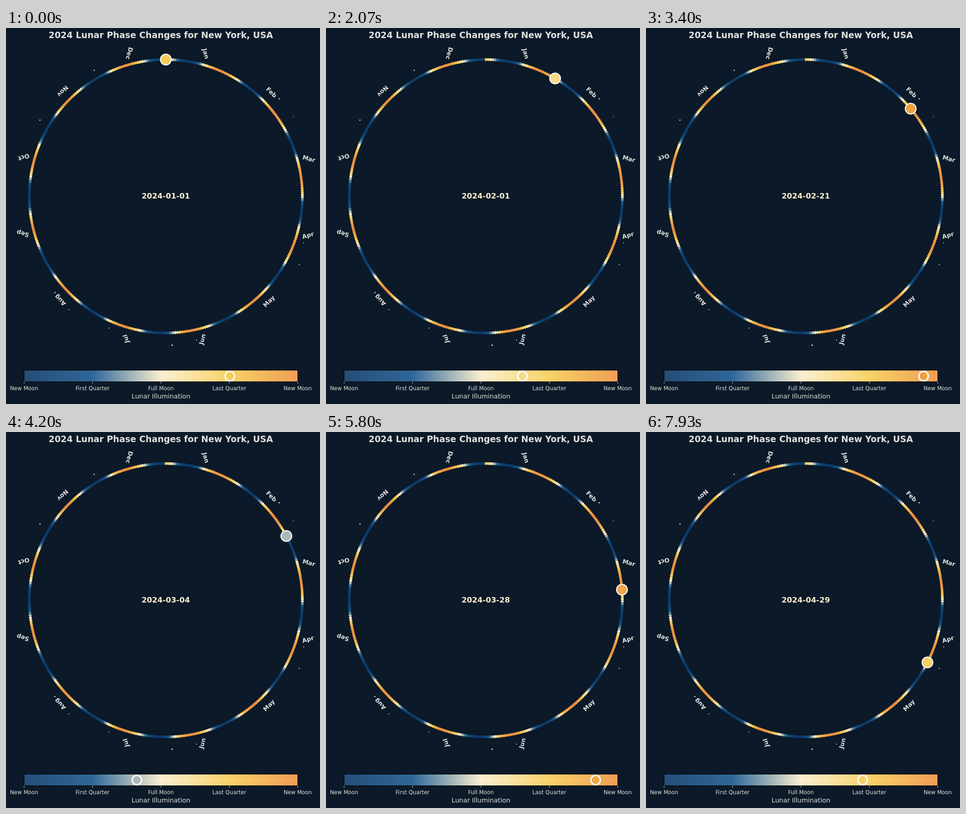
These frames come from a looping animation (684x818 px, 8 s). An HTML page with a canvas:

```html
<!DOCTYPE html>
<html lang="en">
<head>
<meta charset="utf-8">
<title>Lunar phases</title>
<style>
html, body { margin: 0; width: 100%; height: 100%; overflow: hidden; background: #0c1928; }
canvas { display: block; }
</style>
</head>
<body>
<canvas id="stage" width="684" height="818"></canvas>
<script>
const ctx = document.getElementById('stage').getContext('2d');
const W = 684, H = 818, LOOP = 8000, DAYS = 366;
const BG = '#0c1928', INK = '#e0e1dd', CREAM = '#fdf2d0';
const RING = { x: 348.2, y: 366, r: 297.4 };
const BAR = { x: 39.5, y: 744.5, w: 596, h: 25 };
const STOPS = [[12, 58, 105], [24, 86, 140], [250, 237, 205], [246, 205, 88], [238, 147, 64]];
const MONTHS = ['Jan', 'Feb', 'Mar', 'Apr', 'May', 'Jun', 'Jul', 'Aug', 'Sep', 'Oct', 'Nov', 'Dec'];
const STARS = [
  [192, 92, 1.3], [74, 200.5, 1.3], [595, 154, 1.3], [626, 193, .8], [648.5, 467.5, 1],
  [639, 514.5, 1.1], [106.5, 575.5, 1.3], [137, 613, 1], [224, 653, 1], [362, 690, 1.5], [415, 679, 1]
];
const SANS = '"DejaVu Sans", sans-serif';
const rad = deg => deg * Math.PI / 180;
const sin = deg => Math.sin(rad(deg));
const rgb = c => `rgb(${c.map(Math.round).join()})`;

// Moon elongation in degrees, t in days since J2000
function elongation(t) {
  const D = 297.8502 + 12.19074912 * t;
  const M = 357.5291 + 0.98560028 * t;
  const P = 134.9634 + 13.06499295 * t;
  return D + 6.289 * sin(P) - 2.1 * sin(M) + 1.274 * sin(2 * D - P)
    + 0.658 * sin(2 * D) + 0.214 * sin(2 * P) + 0.11 * sin(D);
}

// Illuminated fraction when the Moon crosses the local meridian
function illumination(day) {
  const noon = 8765.5 + day + 16.93 / 24;
  let t = noon;
  for (let i = 0; i < 3; i++) {
    const e = elongation(t) / 360;
    t = noon + e - Math.round(e);
  }
  return (1 - Math.cos(rad(elongation(t)))) / 2;
}

function color(v) {
  const p = Math.min(v * 4, 3.9999), i = Math.floor(p), f = p - i;
  return rgb(STOPS[i].map((c, k) => c + (STOPS[i + 1][k] - c) * f));
}

function onRing(deg, r = RING.r) {
  return [RING.x + r * sin(deg), RING.y - r * Math.cos(rad(deg))];
}

function disc(x, y, r, fill, line) {
  ctx.beginPath();
  ctx.arc(x, y, r, 0, 2 * Math.PI);
  ctx.fillStyle = fill;
  ctx.fill();
  if (line) {
    ctx.strokeStyle = '#fff';
    ctx.lineWidth = line;
    ctx.stroke();
  }
}

function label(text, x, y, size, weight = '', fill = INK) {
  ctx.font = `${weight} ${size}px ${SANS}`;
  ctx.textAlign = 'center';
  ctx.fillStyle = fill;
  ctx.fillText(text, x, y);
}

const lit = Array.from({ length: DAYS }, (_, d) => illumination(d));

function drawBar() {
  const g = ctx.createLinearGradient(BAR.x, 0, BAR.x + BAR.w, 0);
  STOPS.forEach((c, i) => g.addColorStop(i / 4, rgb(c.map(v => v * 0.9 + 25.5))));
  ctx.fillStyle = g;
  ctx.fillRect(BAR.x, BAR.y, BAR.w, BAR.h);
  ctx.strokeStyle = '#000';
  ctx.lineWidth = 1;
  ctx.strokeRect(BAR.x, BAR.y, BAR.w, BAR.h);
  ['New Moon', 'First Quarter', 'Full Moon', 'Last Quarter', 'New Moon'].forEach((name, i) => {
    const x = BAR.x + BAR.w * i / 4;
    ctx.fillStyle = INK;
    ctx.fillRect(x - 0.5, BAR.y + BAR.h, 1, 4);
    label(name, x, 788, 11.8);
  });
  label('Lunar Illumination', 337.5, 806, 14.15);
}

function drawMonths() {
  MONTHS.forEach((name, i) => {
    const deg = 15.5 + 30 * i;
    ctx.save();
    ctx.translate(...onRing(deg, 321.5));
    ctx.rotate(rad(90 - deg));
    label(name, 0, 3.5, 13, 'bold');
    ctx.restore();
  });
}

function drawScene(day) {
  ctx.fillStyle = BG;
  ctx.fillRect(0, 0, W, H);
  for (const [x, y, r] of STARS) disc(x, y, r, '#f4f6f8');
  lit.forEach((v, d) => disc(...onRing(d * 360 / DAYS), 3.1, color(v)));
  label('2024 Lunar Phase Changes for New York, USA', 337.2, 22.3, 18.9, 'bold');
  drawMonths();
  drawBar();

  const date = new Date(Date.UTC(2024, 0, 1 + day)).toISOString().slice(0, 10);
  label(date, 348, 371, 16.45, 'bold', CREAM);
  const v = lit[day], fill = color(v);
  disc(...onRing(day * 360 / DAYS), 11.7, fill, 2.2);
  disc(BAR.x + BAR.w * v, 757.2, 10.2, fill, 3);
}

// Three days every 200 ms, held for 70, 60 and 70 ms
function dayAt(t) {
  const part = t % 200;
  return Math.floor(t / 200) * 3 + (part >= 70) + (part >= 130);
}

let start;
function tick(now) {
  start ??= now;
  drawScene(dayAt((now - start) % LOOP));
  requestAnimationFrame(tick);
}
drawScene(0);
requestAnimationFrame(tick);
</script>
</body>
</html>
```
